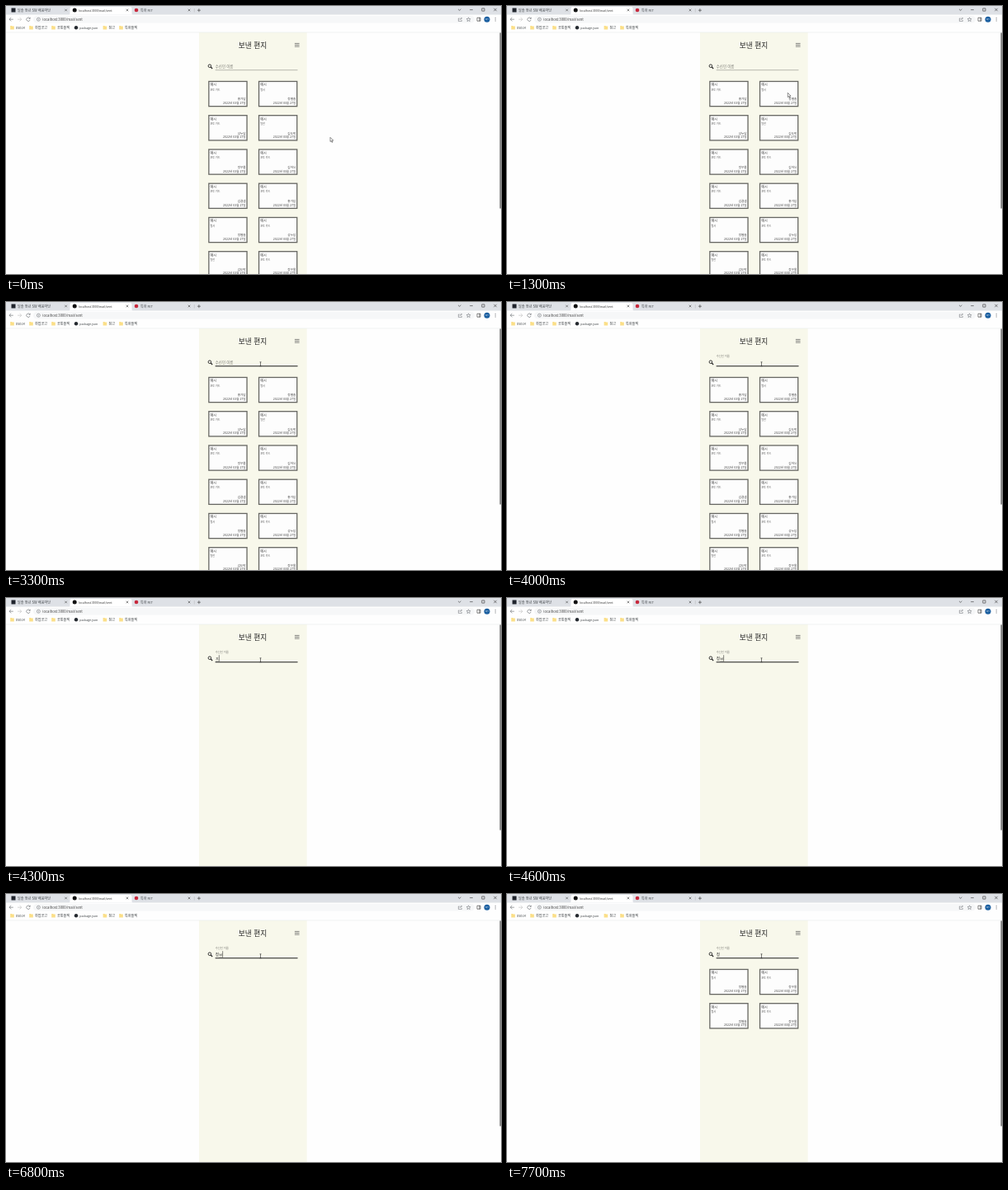
Recreate the animation shown at these times as an HTML page. Size 600 px wide and 325 px high, loop 8 s.

```html
<!DOCTYPE html>
<html lang="ko">
<head>
<meta charset="utf-8">
<title>보낸 편지</title>
<style>
html, body { margin: 0; width: 100%; height: 100%; overflow: hidden; background: #fff; }
svg { display: block; width: 100vw; height: 100vh; }
text { font-family: "Noto Sans CJK KR", "Noto Sans CJK JP", "Noto Sans CJK", sans-serif; font-weight: 300; white-space: pre; }
.line { fill: none; stroke: #5f6368; stroke-width: .6; }
</style>
</head>
<body>
<svg id="stage" viewBox="0 0 600 325">
  <rect width="600" height="325" fill="#fefefe"/>
  <rect x="234" y="32" width="130.7" height="293" fill="#f8f8eb"/>

  <g id="browser">
    <rect width="600" height="10.5" fill="#dee1e6"/>
    <path d="M76 10.5q1.5 0 1.5-1.5V3q0-2 2-2h71q2 0 2 2v6q0 1.5 1.5 1.5z" fill="#fff"/>
    <rect x="33" y="12" width="535" height="8.6" rx="4.3" fill="#f6f7f8"/>
    <path d="M0 32H600" stroke="#e3e4e6" stroke-width=".5"/>
    <rect x="6.5" y="2.5" width="5" height="5" fill="#20242c"/>
    <circle cx="83.2" cy="5" r="2.5" fill="#111"/>
    <circle cx="158" cy="5" r="2.3" fill="#c8283c"/>
    <circle cx="85" cy="26.2" r="2.2" fill="#24292f"/>
    <g class="line">
      <path d="M8.8 16.2H4M6.2 14l-2.2 2.2 2.2 2.2"/>
      <path d="M14 16.2h4.8M16.6 14l2.2 2.2-2.2 2.2" stroke="#bbb"/>
      <path d="M28.8 14.9a2.2 2.2 0 1 0 .3 2M29.2 13.7v1.7h-1.7"/>
      <circle cx="39.4" cy="16.2" r="2" stroke-width=".5"/><path d="M39.4 15.9v1.3M39.4 15v.4" stroke-width=".5"/>
      <path d="M549.8 15h-1.4v3.4h4V17M550 16.9q.2-1.9 2.4-1.9M551.4 13.8l1.2 1.2-1.2 1.2" stroke-width=".5"/>
      <path d="M560.6 13.8l.7 1.7 1.8.1-1.4 1.2.5 1.8-1.6-1-1.6 1 .5-1.8-1.4-1.2 1.8-.1z" stroke-width=".5"/>
      <path d="M571 14.2h4v4h-4zM573.9 14.2v4" stroke="#333"/>
      <path d="M228.3 3v4.5" stroke="#aaa" stroke-width=".4"/>
      <g stroke="#333" stroke-width=".6">
        <path d="M231.9 5.2h4M233.9 3.2v4"/>
        <path d="M548 3.8l1.7 1.6 1.7-1.6M562.2 4.6h3.6M576.8 2.9h3.2v3.2h-3.2zM591.3 2.8l3.4 3.4M594.7 2.8l-3.4 3.4"/>
      </g>
    </g>
    <circle cx="583" cy="16.2" r="3.5" fill="#1b5fa0"/>
    <path d="M593.2 14v.9M593.2 15.8v.9M593.2 17.6v.9" stroke="#5f6368" stroke-width=".9"/>
  </g>

  <rect id="thumb" x="598.4" y="32.5" width="1.6" fill="#7d7d7d"/>

  <path d="M349.9 45.4h5.7M349.9 47.3h5.7M349.9 49.2h5.7" stroke="#555" stroke-width=".7"/>
  <circle cx="246.9" cy="72.7" r="1.8" fill="none" stroke="#222" stroke-width=".9"/>
  <path d="M248.2 74l2 2" stroke="#222" stroke-width="1.1"/>
  <path d="M253.7 77.7h99.8" stroke="#8b8b85" stroke-width=".6"/>
  <path id="focusLine" d="M253.7 77.7h99.8" stroke="#333" stroke-width="1.1"/>
  <g id="labels"></g>
  <g id="cards"></g>
  <g id="field"></g>
  <path id="composing" stroke="#777" stroke-width=".4"/>
  <path id="caret" stroke="#333" stroke-width=".6"/>
  <path id="arrow" d="M0 0v5.2l1.2-1.1.9 2 .9-.4-.9-1.9h1.7z" fill="#fff" stroke="#222" stroke-width=".5"/>
  <path id="ibeam" d="M307.5 72.8h2M308.5 72.8v4.9M307.5 77.7h2" stroke="#222" stroke-width=".6"/>
</svg>
<script>
const $ = id => document.getElementById(id);

function make(parent, tag, attrs, content = "") {
  const el = document.createElementNS("http://www.w3.org/2000/svg", tag);
  for (const key in attrs) el.setAttribute(key, attrs[key]);
  el.textContent = content;
  return parent.appendChild(el);
}
const label = (parent, x, y, size, fill, content, anchor = "start") =>
  make(parent, "text", { x, y, "font-size": size, fill, "text-anchor": anchor }, content);

// Browser chrome
const browser = $("browser");
label(browser, 14, 6.5, 4.15, "#45494d", "달솔 청년 SW 배움마당");
label(browser, 88, 6.5, 3.5, "#333", "localhost:3000/mail/sent");
label(browser, 163, 6.5, 4, "#45494d", "특화 PJT");
label(browser, 44.3, 17.8, 4.2, "#444", "localhost:3000/mail/sent");
label(browser, 583, 17.2, 2.6, "#fff", "NT", "middle");
for (const x of [72.6, 147, 222])
  make(browser, "path", { d: `M${x - 1.3} 3.7l2.6 2.6m0-2.6l-2.6 2.6`, stroke: "#444", "stroke-width": .6 });
const bookmarks = [["DSOLM", 12, 3.2], ["취업공고", 35, 4.1], ["공통플젝", 62, 4.1],
  ["package.json", 89.3, 3.6], ["참고", 124.4, 4.1], ["특화플젝", 144, 4.1]];
for (const [name, x, size] of bookmarks) {
  label(browser, x, 27.7, size, "#3c4043", name);
  if (name !== "package.json")
    make(browser, "path", { d: `M${x - 6.8} 24h1.8l.6.6h2.2v3.8h-4.6z`, fill: "#fbdf88" });
}

// Page
label($("labels"), 299, 50.9, 8.7, "#222", "보낸 편지", "middle");
const hint = label($("labels"), 0, 0, 4.4, "#777771", "수신인 이름");
const typed = label($("field"), 253.8, 75.1, 4.7, "#333", "");

const people = [["홍가담", "포토 카드"], ["정별솔", "엽서"], ["성누담", "포토 카드"], ["김도막", "일반"],
  ["정우물", "포토 카드"], ["김하늬", "포토 카드"], ["김결샘", "포토 카드"]];
const letters = Array.from({ length: 12 }, (_, i) => people[i % people.length]);

const cards = letters.map(([name, kind]) => {
  const card = make($("cards"), "g", {});
  make(card, "rect", { x: .65, y: .65, width: 46.2, height: 30.2, fill: "#fdfdfd", stroke: "#666662", "stroke-width": 1.3 });
  label(card, 2.4, 6.7, 4.1, "#444", "예시");
  label(card, 2.4, 11.8, 3, "#555", kind);
  label(card, 45.4, 23.7, 3.6, "#444", name, "end");
  label(card, 45.4, 28.4, 3.55, "#444", "2022년 03월 27일", "end");
  return { card, name };
});

function showCards(query) {
  let slot = 0;
  for (const { card, name } of cards) {
    const match = name.includes(query);
    card.setAttribute("visibility", match ? "visible" : "hidden");
    if (!match) continue;
    card.setAttribute("transform", `translate(${245.2 + slot % 2 * 60.7} ${90.8 + (slot >> 1) * 41.25})`);
    slot++;
  }
  $("thumb").setAttribute("height", slot > 4 ? 213 : 249);
}

// [time, query]
const typing = [[0, ""], [4300, "ㅈ"], [4400, "저"], [4500, "정"], [4600, "정ㅂ"], [4700, "정별"],
  [6600, "정벼"], [6800, "정ㅂ"], [7200, "정"]];
// [time, x, y]
const path = [[0, 393, 159.3], [100, 386, 151], [200, 370, 134], [300, 354, 118], [400, 344, 109],
  [500, 340.6, 105.6], [1300, 340.3, 105.3], [2700, 332.8, 99.8], [2800, 320, 90], [2900, 309, 82], [3000, 304.4, 79.2]];
// Times at which the caret turns on or off
const blinks = [3500, 4000, 4300, 5300, 5800, 6300, 6600, 7700];

const latest = (list, t) => list.filter(item => item[0] <= t).pop();
const ease = p => 1 - (1 - p) ** 2;
const ramp = (t, start, span) => ease(Math.min(1, Math.max(0, (t - start) / span)));
const toggle = (id, on) => $(id).setAttribute("visibility", on ? "visible" : "hidden");

function draw(t) {
  const [since, query] = latest(typing, t);
  showCards(query);
  typed.textContent = query;

  const float = ramp(t, 3400, 300);
  hint.setAttribute("transform", `translate(253.8 ${74.6 - 7.5 * float}) scale(${1 - .25 * float})`);
  $("focusLine").setAttribute("opacity", ramp(t, 3100, 200));

  const x = 254 + 4.32 * query.length;
  $("caret").setAttribute("d", `M${x} 69.2v7.6`);
  toggle("caret", blinks.filter(b => b <= t).length % 2);
  $("composing").setAttribute("d", `M${x - 4.2} 76.3h4`);
  toggle("composing", query && since < 7200);

  const [, mx, my] = latest(path, t);
  $("arrow").setAttribute("transform", `translate(${mx} ${my})`);
  toggle("arrow", t < 3200);
  toggle("ibeam", t >= 3200);
}

let shown = -1;
function tick() {
  const t = Math.floor(performance.now() % 8000 / 100) * 100;
  if (t !== shown) draw(shown = t);
  requestAnimationFrame(tick);
}
tick();
</script>
</body>
</html>
```
